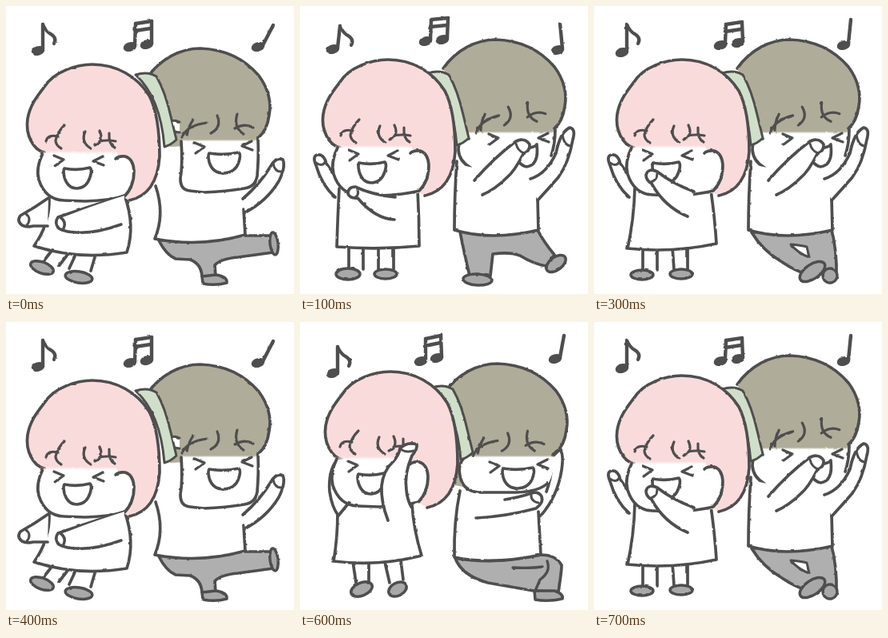
Animation, 360 px wide and 360 px high, one loop 800 ms. Source, as an HTML page with a canvas:

```html
<!DOCTYPE html>
<html lang="en">
<head>
<meta charset="utf-8">
<title>Dancing pair</title>
<style>
html, body { margin: 0; width: 100%; height: 100%; overflow: hidden; background: #fff; }
canvas { display: block; width: 100vw; height: 100vh; filter: url(#crayon); }
svg { position: absolute; }
</style>
</head>
<body>
<svg width="0" height="0">
  <filter id="crayon" x="0" y="0" width="1" height="1" color-interpolation-filters="sRGB">
    <feTurbulence type="fractalNoise" baseFrequency=".16" numOctaves="1" seed="4"/>
    <feDisplacementMap in="SourceGraphic" scale="2.4" xChannelSelector="R" yChannelSelector="G"/>
  </filter>
</svg>
<canvas id="stage" width="360" height="360"></canvas>
<script>
const ctx = document.getElementById('stage').getContext('2d');
const STEP = 100;
const INK = '#4f4e4e', PINK = '#fadbdc', BROWN = '#b0ac9a', GREEN = '#d0dfca';
const PANTS = '#afafaf', SHOE = '#a8a8a8', WHITE = '#fff';

function fill(d, color) {
  ctx.fillStyle = color;
  ctx.fill(new Path2D(d));
}
function line(d, width = 3.7) {
  ctx.lineWidth = width;
  ctx.stroke(new Path2D(d));
}
function shape(d, color = WHITE, width) {
  fill(d, color);
  line(d, width);
}
function at(x, y, draw, turn = 0) {
  ctx.save();
  ctx.translate(x, y);
  ctx.rotate(turn);
  draw();
  ctx.restore();
}
// white that fades in downwards over the fringe
function skin(d, y, soft) {
  const g = ctx.createLinearGradient(0, y - soft, 0, y + soft);
  g.addColorStop(0, 'rgba(255,255,255,0)');
  g.addColorStop(1, WHITE);
  fill(d, g);
}
function oval(x, y, rx, ry, turn, color) {
  ctx.beginPath();
  ctx.ellipse(x, y, rx, ry, turn, 0, 7);
  ctx.fillStyle = color;
  ctx.fill();
}
function shoe(x, y, rx, ry, turn = 0) {
  oval(x, y, rx, ry, turn, SHOE);
  ctx.lineWidth = 3.5;
  ctx.stroke();
}

function stem(x, y, tx, ty) {
  oval(x, y, 8.5, 5.8, -.3, INK);
  line(`M${x + 6} ${y - 2}L${tx} ${ty}`, 4.4);
}
function eighth(x, y, tx, ty) {
  stem(x, y, tx, ty);
  line(`M${tx} ${ty}q4 9 10 12q8 5 4 12`, 4.2);
}
function beamed(x, y, tx, ty, x2, y2, tx2, ty2) {
  stem(x, y, tx, ty);
  stem(x2, y2, tx2, ty2);
  line(`M${tx} ${ty}L${tx2} ${ty2}M${tx - 1} ${ty + 9}L${tx2 - 1} ${ty2 + 9}`, 4.6);
}

function eyes(x, y, x2, y2) {
  line(`M${x} ${y}l12 5l-11 8M${x2} ${y2}l-12 6l13 5`, 3.3);
}
function mouth(x, y, w = 32) {
  shape(`M${x} ${y}q${w / 2} 3 ${w} -1q3 3 0 12q-4 13 ${-w / 2} 14q${-w / 2 + 4} 0 ${-w / 2} -14q-2 -8 0 -11z`);
}

function girlHead(dx, dy, fx, fy) {
  at(dx, dy, () => shape('M50 177C36 174 26 155 29 135C32 118 40 108 50 95C62 76 90 67 110 67C140 67 166 82 181 106C192 127 194 160 194 182C192 212 180 232 156 237', PINK));
  at(fx, fy, () => {
    skin('M46 168L139 168Q138 182 148 182Q162 182 162 198Q161 222 148 234L90 236Q57 235 44 213Q38 196 46 168', 176, 2);
    line('M47 177Q38 196 42 210Q50 235 73 236L100 237Q130 236 149 231Q161 219 161 199Q160 184 150 181Q142 180 138 184');
    line('M51 162Q53 153 66 156M74 142Q65 151 63 161Q63 167 70 171M100 150Q94 163 107 171M118 149Q124 162 112 167M118 162Q128 160 138 162M130 152Q129 166 137 170', 3.2);
    eyes(61, 180, 122, 181);
    mouth(74, 196);
  });
}

// returns the fringe strands, to be drawn over the face
function boyHair(dx, dy, sx, sy, turn = 0) {
  at(dx, dy, () => {
    const d = 'M179 78C195 55 220 42 245 42C275 43 300 55 318 76C330 92 334 110 331 125C329 140 324 148 318 153';
    fill(d + 'L316 160L207 165Q201 120 179 78', BROWN);
    line(d);
  });
  return () => at(sx, sy, () =>
    line('M-44 14Q-38 -1 -13 -4M-30 -8Q-37 3 -38 11M0 -13Q6 2 -8 9M25 -15Q20 2 33 10M22 3Q34 -4 45 2', 3.2), turn);
}

function ribbon(dx, dy) {
  at(dx, dy, () => shape('M160 84Q175 79 186 86Q197 105 204 136L211 165Q204 172 196 174Q191 112 160 84', GREEN, 3));
}

const boyTop = () => {
  const fringe = boyHair(0, 0, 262, 139, -.14);
  skin('M204 158L319 150Q318 192 300 212L225 214Q200 200 204 158', 158, 1.5);
  line('M211 166Q198 164 198 180Q199 194 213 202M319 154Q319 172 314 187');
  fringe();
  eyes(236, 160, 310, 159);
  shape('M270 178Q285 180 296 174Q299 199 283 201Q270 198 270 178');
};
const boyArms = () => {
  fill('M198 198L230 205L290 212L297 280Q240 294 193 280Z', WHITE);
  line('M196 194Q193 238 193 280Q240 294 298 280L297 240');
  shape('M218 218Q242 190 270 169Q281 164 287 173Q288 181 279 185Q268 207 258 215Q244 229 228 236');
  line('M270 172Q272 181 280 184', 3);
  shape('M288 216Q308 210 320 184Q325 158 337 152Q345 153 341 167Q336 196 323 214Q309 230 297 243');
  line('M328 161Q330 174 338 175', 3);
};

function girlLeftArm() {
  shape('M44 239Q27 224 20 199Q15 187 22 186Q30 185 33 197L43 211');
  line('M20 196Q28 202 32 194', 3);
}

const poses = [
  () => {
    eighth(40, 56, 46, 23);
    beamed(155, 51, 162, 22, 176, 48, 182, 19);
    stem(315, 51, 334, 24);

    const fringe = boyHair(-2, 11, 264, 150);
    shape('M217 145Q206 140 206 149Q207 158 217 158', WHITE, 3);
    shape('M191 293Q200 311 212 316L230 317Q244 322 245 338L262 338L261 324Q268 316 290 314L334 308L331 287L298 287Z', PANTS);
    shape('M245 338L262 336Q277 338 276 346Q262 350 246 347Z', SHOE, 3.5);
    shoe(335, 297, 5, 14, -.12);
    fill('M187 225L295 228L300 286Q243 302 186 291Z', WHITE);
    line('M187 225Q199 260 186 291Q243 302 299 286L297 254');
    shape('M296 241Q318 222 331 200Q338 188 346 192Q350 201 341 219Q326 244 299 258');
    line('M334 197Q336 208 345 207', 3);
    skin('M219 163L315 163Q318 205 314 218Q308 228 290 229L247 233Q222 233 218 220Z', 168, 1.5);
    line('M219 169Q221 197 218 216Q218 230 230 231L247 233Q275 232 298 228Q312 226 314 212Q316 190 315 166');
    fringe();
    eyes(236, 171, 307, 169);
    mouth(254, 184, 37);
    ribbon(2, 2);

    fill('M62 306L50 322L64 328L78 310M87 312L79 330L104 335L111 312', WHITE);
    line('M57 306L47 319M76 312L66 325M86 313L79 328M111 314L106 331');
    shoe(45, 327, 15, 7, .35);
    shoe(91, 339, 17, 7, .15);
    shape('M54 240Q55 272 35 300Q90 318 151 308Q162 275 148 236');
    shape('M53 240Q36 252 18 262Q13 269 20 274Q26 277 34 275L52 275');
    line('M24 259Q33 266 26 274', 3);
    girlHead(-2, 6, -1, 7);
    shape('M148 237Q100 252 65 264Q60 271 66 278Q72 282 77 276');
    shape('M148 237Q100 252 70 265L71 281Q104 288 144 273', WHITE, .01);
    line('M70 280Q100 289 144 273M68 264Q76 270 72 278', 3.5);
  },
  () => {
    eighth(41, 54, 50, 25);
    beamed(157, 44, 164, 17, 178, 42, 185, 15);
    stem(322, 55, 325, 22);

    shape('M200 282Q205 308 212 337L238 337L241 310Q263 307 275 312Q293 323 308 325L318 311Q304 294 297 280Z', PANTS);
    shoe(222, 342, 18, 7, .05);
    shoe(320, 322, 14, 8, -.65);
    boyTop();
    boyArms();
    ribbon(0, 0);

    line('M61 302V329M79 302V329M98 302V329M117 302V329');
    shoe(60, 335, 15, 7);
    shoe(107, 335, 14, 6);
    shape('M49 228Q47 265 46 301Q98 305 149 300Q149 265 147 230');
    girlLeftArm();
    girlHead(0, 0, 0, 0);
    shape('M119 239Q90 236 69 226Q60 226 60 235Q63 241 72 240Q94 266 118 267');
    line('M71 228Q75 236 69 239', 3);
  },
  () => {
    eighth(41, 64, 47, 31);
    beamed(151, 49, 157, 21, 171, 45, 176, 17);
    stem(319, 46, 330, 17);

    const fringe = boyHair(2, 10, 260, 152, -.03);
    shape('M194 295Q202 317 235 326L292 336L323 337Q327 312 327 304Q320 291 301 291Q240 304 194 295', PANTS);
    line('M266 307Q288 308 303 306M309 299Q314 312 300 322L294 336', 3.3);
    shape('M293 336L318 336Q330 340 328 346Q310 350 294 347Z', SHOE, 3.5);
    fill('M188 160L207 166L205 206L192 204Z', BROWN);
    fill('M200 209L306 206L301 291Q240 304 193 294Z', WHITE);
    line('M200 211Q192 250 193 294Q240 304 301 291L298 237');
    shape('M308 212Q314 196 315 176Q316 161 325 160Q330 165 327 185Q322 218 301 242');
    skin('M205 163L320 160Q317 199 306 206L223 213Q190 203 205 163', 168, 1.5);
    line('M205 170Q196 180 201 196Q205 211 223 213L270 213Q298 212 309 202M323 161L318 166');
    fringe();
    eyes(237, 175, 309, 172);
    mouth(254, 183, 37);
    shape('M220 245Q258 243 295 233Q305 226 302 218Q298 211 289 214Q275 219 256 222');
    line('M289 215Q288 224 298 226', 3);
    ribbon(5, -2);

    line('M66 299L70 326M86 302L86 327M106 300L112 326M126 298L129 322');
    shoe(77, 334, 14, 8, -.4);
    shoe(122, 334, 12, 8, -.5);
    shape('M47 238Q47 270 42 299Q98 306 152 292Q142 260 140 228');
    shape('M47 171Q35 186 37 212Q40 232 48 242L66 220');
    girlHead(3, -5, -1, -6);
    fill('M109 238L104 190L130 160L134 195L138 236Z', WHITE);
    shape('M110 248Q101 225 102 205Q104 186 116 175Q124 166 125 158Q134 149 146 153Q147 159 140 167Q130 190 133 210Q134 222 139 231');
    line('M125 158Q131 164 142 161', 3);
  },
  () => {
    eighth(35, 58, 41, 23);
    beamed(158, 49, 165, 23, 180, 46, 185, 20);
    stem(312, 49, 321, 17);

    shape('M197 283Q211 306 235 320Q251 331 268 336L287 324L288 339L303 339Q304 307 297 280Z', PANTS);
    shape('M246 298Q258 299 266 301L269 314Q255 309 246 298Z', WHITE, 3);
    shoe(295, 337, 9, 9, -.3);
    shoe(273, 332, 18, 9, -.6);
    boyTop();
    boyArms();
    ribbon(0, 0);

    line('M61 302V330M79 302V330M98 302L100 329M117 302L117 329');
    shoe(60, 336, 14, 6);
    shoe(109, 335, 14, 6);
    shape('M51 228Q50 266 42 303Q98 309 153 297Q151 265 146 230');
    girlLeftArm();
    girlHead(0, 0, 0, 0);
    shape('M125 232Q98 222 79 207Q68 202 65 211Q65 218 72 222Q88 251 117 263');
    line('M79 209Q79 218 71 220', 3);
  }
];

ctx.lineCap = ctx.lineJoin = 'round';

function frame(now) {
  ctx.fillStyle = WHITE;
  ctx.fillRect(0, 0, 360, 360);
  ctx.strokeStyle = INK;
  poses[Math.floor(now / STEP) % poses.length]();
  requestAnimationFrame(frame);
}
requestAnimationFrame(frame);
</script>
</body>
</html>
```
